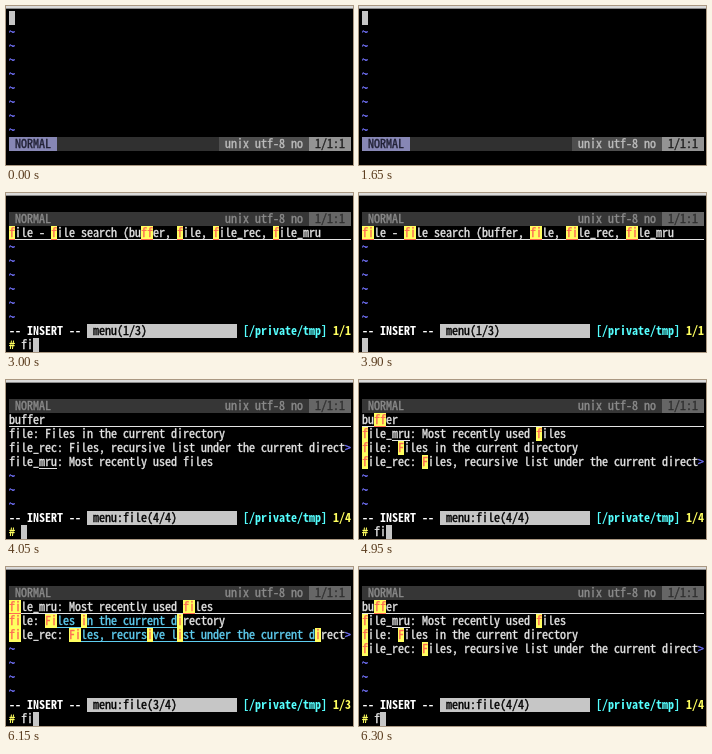
An HTML page that plays this animation: 347 by 159 pixels, repeating every 8000 ms.

```html
<!DOCTYPE html>
<html lang="en">
<head>
<meta charset="utf-8">
<title>Fuzzy finder in a terminal</title>
<style>
html, body { margin: 0; width: 100%; height: 100%; overflow: hidden; background: #000; }
#stage {
  position: relative; width: 347px; height: 159px; overflow: hidden; background: #000;
  color: #e4e4e4; font: 12px "Noto Sans Mono CJK JP", "Noto Sans Mono", "DejaVu Sans Mono", monospace;
  font-variant-ligatures: none; font-kerning: none; -webkit-text-stroke: .35px;
}
.strip { position: absolute; inset: 0 0 auto; height: 3px; background: linear-gradient(#dadada 2px, #8a8a8a 2px); }
.scene { position: absolute; inset: 0; visibility: hidden; }
.run { position: absolute; height: 14px; line-height: 12px; white-space: pre; }
.tilde { color: #7474ff; }
.cursor { background: #c6c6c6; }
.line, .range { box-shadow: inset 0 -1px currentColor; }
.range { color: #5fcdf0; }
.hit { background: #ffff5f; color: #ff6a55; }
.mode { background: #8787b5; color: #202034; }
.fill { background: #303030; }
.info { background: #4e4e4e; color: #bcbcbc; }
.pos { background: #949494; color: #202020; }
.idle { background: #363636; color: #8a8a8a; }
.idlePos { background: #666; color: #303030; }
.bold { font-weight: bold; color: #fff; }
.source { background: #c6c6c6; color: #000; }
.path { color: #5ff; font-weight: bold; }
.count, .prompt { color: #ffff5f; font-weight: bold; }
.bold, .path, .count, .prompt { -webkit-text-stroke: 0; }
</style>
</head>
<body>
<div id="stage"></div>
<script>
const LOOP = 8000, CELL = 6, ROW = 14, COLS = 57;
const stage = document.getElementById('stage');

// Pick the type size whose natural advance is one cell.
const pen = document.createElement('canvas').getContext('2d');
pen.font = '100px ' + getComputedStyle(stage).fontFamily;
stage.style.fontSize = CELL * 100 / pen.measureText('m').width + 'px';

const strip = document.createElement('div');
strip.className = 'strip';

function put(scene, col, row, text, cls = '') {
  const run = document.createElement('span');
  run.className = 'run ' + cls;
  run.textContent = text;
  run.style.cssText = `left:${3 + col * CELL}px;top:${5 + row * ROW}px;width:${text.length * CELL}px`;
  scene.append(run);
}

function tildes(scene, from) {
  for (let row = from; row < 9; row++) put(scene, 0, row, '~', 'tilde');
}

function statusBar(scene, row, idle) {
  put(scene, 0, row, ' NORMAL ', idle ? 'idle' : 'mode');
  put(scene, 8, row, ' '.repeat(27), idle ? 'idle' : 'fill');
  put(scene, 35, row, ' unix utf-8 no ', idle ? 'idle' : 'info');
  put(scene, 50, row, ' 1/1:1 ', idle ? 'idlePos' : 'pos');
}

// "fil" becomes f[^f]*i[^i]*l
const fuzzy = query => new RegExp(query.replace(/(.)(?!$)/g, '$1[^$1]*'), 'gi');

function styleOf(text, query) {
  const styles = Array(text.length).fill('');
  if (query) for (const match of text.matchAll(fuzzy(query)))
    for (let i = match.index; i < match.index + match[0].length; i++)
      styles[i] = query.includes(text[i].toLowerCase()) ? 'hit' : 'range';
  if (text[COLS - 1] === '>') styles[COLS - 1] = 'tilde';
  return styles;
}

function listRow(scene, row, text, query, current) {
  if (current) text = text.padEnd(COLS);
  const styles = styleOf(text, query);
  for (let a = 0, b; a < text.length; a = b) {
    for (b = a + 1; b < text.length && styles[b] === styles[a];) b++;
    put(scene, a, row, text.slice(a, b), styles[a] + (current ? ' line' : ''));
  }
  // The spell checker marks this word.
  const typo = text.indexOf('mru');
  if (typo >= 0 && !current) put(scene, typo, row, '   ', 'line');
}

function editor(keys = '') {
  return scene => {
    put(scene, 0, 0, ' ', 'cursor');
    tildes(scene, 1);
    statusBar(scene, 9, false);
    put(scene, 46, 10, keys);
  };
}

function finder({ items, query, input, source, total }) {
  return scene => {
    statusBar(scene, 1, true);
    items.forEach((text, i) => listRow(scene, 2 + i, text, query, i === 0));
    tildes(scene, 2 + items.length);
    put(scene, 0, 9, '-- INSERT --', 'bold');
    put(scene, 13, 9, ` ${source}(${items.length}/${total})`.padEnd(25), 'source');
    put(scene, 39, 9, '[/private/tmp]', 'path');
    put(scene, 54, 9, '1/' + items.length, 'count');
    if (input === null) return put(scene, 0, 10, ' ', 'cursor');
    put(scene, 0, 10, '#', 'prompt');
    put(scene, 2, 10, input);
    put(scene, 2 + input.length, 10, ' ', 'cursor');
  };
}

const search = 'file - file search (buffer, file, file_rec, file_mru';
const topics = [search, 'grep - text search (grep, line)', 'help - show help (help, command)'];
const buffer = 'buffer';
const file = 'file: Files in the current directory';
const rec = 'file_rec: Files, recursive list under the current direct>';
const mru = 'file_mru: Most recently used files';

const menu = (items, query, input) =>
  finder({ items, query, input, source: 'menu', total: 3 });
const files = (items, query, input) =>
  finder({ items, query, input, source: 'menu:file', total: 4 });
const all = [buffer, mru, file, rec], few = [mru, file, rec];

const timeline = [
  [0, editor()],
  [1050, editor(',')],
  [1500, editor('[denite]')],
  [1650, editor()],
  [1800, menu(topics, '', '')],
  [3000, menu([search], 'f', 'fi')],
  [3150, menu([search], 'fi', 'fi')],
  [3900, menu([search], 'fi', null)],
  [4050, files([buffer, file, rec, mru], '', '')],
  [4950, files(all, 'f', 'fi')],
  [5100, files(few, 'fi', 'fi')],
  [5250, files(few, 'fi', 'fil')],
  [5400, files(few, 'fil', 'fil')],
  [6000, files(few, 'fil', 'fi')],
  [6150, files(few, 'fi', 'fi')],
  [6300, files(all, 'f', 'f')],
];

const sheet = document.createElement('style');
timeline.forEach(([start, draw], i) => {
  const end = i + 1 < timeline.length ? timeline[i + 1][0] : LOOP;
  const scene = document.createElement('div');
  scene.className = 'scene';
  scene.style.animation = `show${i} ${LOOP}ms step-end infinite`;
  draw(scene);
  stage.append(scene);
  sheet.textContent += `@keyframes show${i} {
    ${start ? '0% { visibility: hidden }' : ''}
    ${start / LOOP * 100}% { visibility: visible }
    ${end / LOOP * 100}% { visibility: hidden }
  }\n`;
});
stage.append(strip);
document.head.append(sheet);
</script>
</body>
</html>
```
